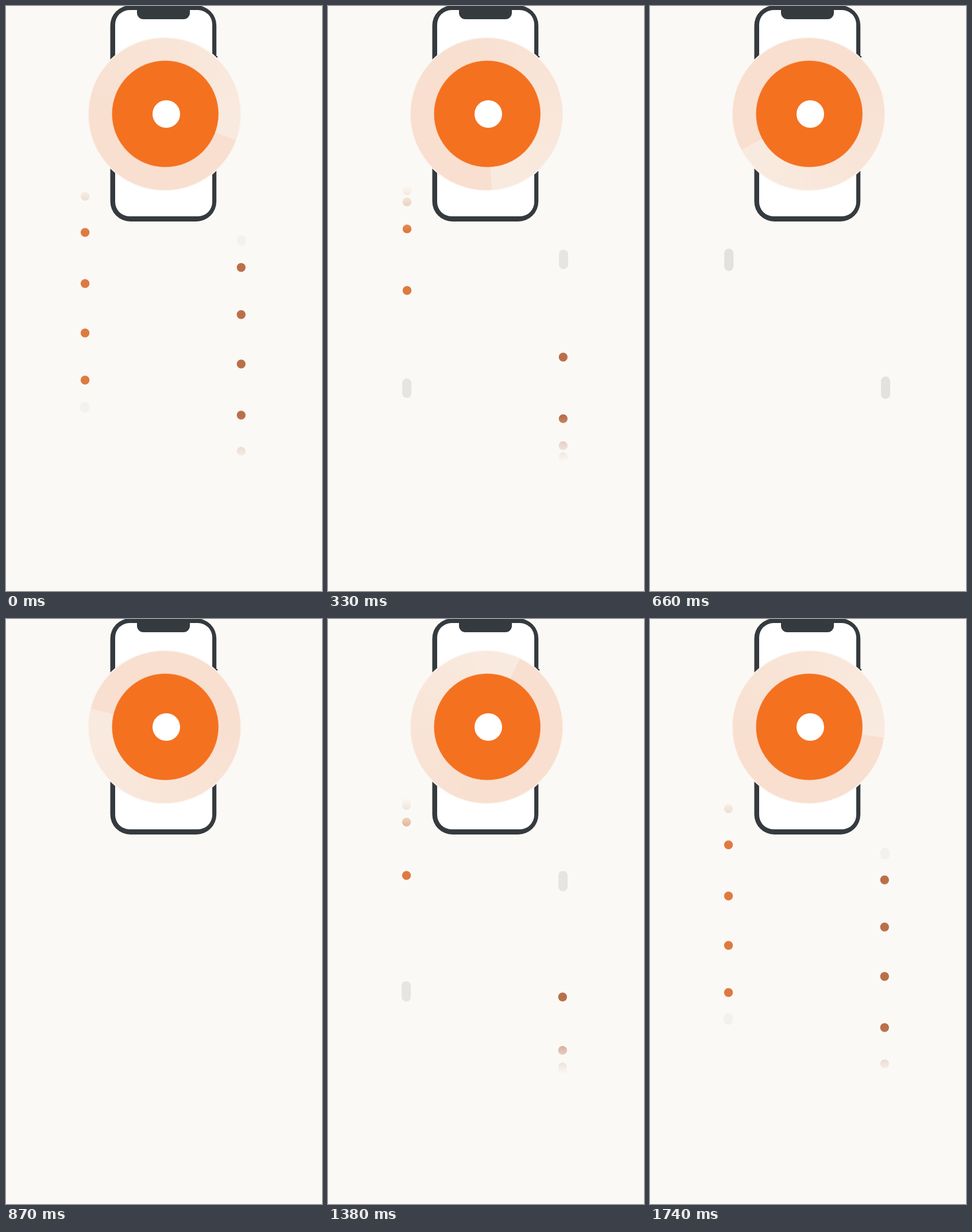
These frames come from a looping animation (550 px wide and 1018 px high, 1770 ms). An HTML page with a canvas:

```html
<!DOCTYPE html>
<html lang="en">
<head>
<meta charset="utf-8">
<title>Phone pairing</title>
<style>
  html, body { margin: 0; width: 100%; height: 100%; overflow: hidden; background: #fbf9f5; }
  canvas { display: block; }
</style>
</head>
<body>
<canvas id="stage" width="550" height="1018"></canvas>
<script>
const ctx = document.getElementById('stage').getContext('2d');
const LOOP = 1770, STEP = 30;
const BACKGROUND = '#fbf9f5', DARK = '#353a3e';
const TOP = 315, MIRROR = 1106;
const RESTING_DOTS = [651, 569, 483, 394, 331];

const clamp = x => Math.min(1, Math.max(0, x));
const smooth = x => x * x * (3 - 2 * x);
const down = y => y, up = y => MIRROR - y;

// Dots blend into the background toward the outer end of their column.
function columnPaint(pale, full, toY) {
  const paint = ctx.createLinearGradient(0, toY(313), 0, toY(391));
  paint.addColorStop(0, BACKGROUND);
  paint.addColorStop(.4, pale);
  paint.addColorStop(1, full);
  return paint;
}

const leftPaint = columnPaint('#ecd8ca', '#de7a40', down);
const rightPaint = columnPaint('#e8d5cd', '#b9704a', up);

function disc(x, y, radius, fill) {
  ctx.beginPath();
  ctx.arc(x, y, radius, 0, 2 * Math.PI);
  ctx.fillStyle = fill;
  ctx.fill();
}

function box(x, y, w, h, radius, fill) {
  ctx.beginPath();
  ctx.roundRect(x, y, w, h, radius);
  ctx.fillStyle = fill;
  ctx.fill();
}

// away: ms between this moment and the nearest full state.
function drawColumn(away, dotX, capsuleX, paint, toY) {
  const spread = smooth(clamp((660 - away) / 630));
  if (spread > 0) {
    RESTING_DOTS.forEach((rest, i) => {
      const y = TOP + (rest - TOP) * spread ** (i + 1);
      disc(dotX, toY(y), 7.7, paint);
    });
  }

  const travel = 5.7 * (Math.exp(.0058 * away) - 1);
  const grown = 1 - (1 - clamp(away / 660)) ** 2;
  const length = 19 + 20 * grown;
  const shade = (.028 + .07 * grown) * clamp((380 - travel) / 100);
  box(capsuleX - 8, toY(698 - travel) - length / 2, 16, length, 8, `rgba(0,18,34,${shade})`);
}

function drawPhone() {
  box(181.5, -1, 184.7, 376, 35, DARK);
  box(190, 7, 169, 359, 25, '#fff');
  box(228, 0, 92, 23, [0, 0, 11, 11], DARK);
  box(366, 87, 2, 3, 0, DARK);
}

function drawBadge(t) {
  const sweep = ctx.createConicGradient((20 + .2 * t) * Math.PI / 180, 276, 188);
  sweep.addColorStop(0, '#f8dfcf');
  sweep.addColorStop(.42, '#f8dfcf');
  sweep.addColorStop(.95, '#f9eadf');
  sweep.addColorStop(1, '#f9eadf');
  disc(276, 188, 134, '#fcf6f1');
  disc(276, 188, 132.3, sweep);
  disc(277.2, 187.7, 92.9, '#f6a675');
  disc(277.2, 187.7, 92.3, '#f47120');
  disc(279, 188, 24, '#fff');
}

function draw(now) {
  const t = Math.floor(now % LOOP / STEP) * STEP;
  const away = Math.min(t, LOOP - t);

  ctx.fillStyle = BACKGROUND;
  ctx.fillRect(0, 0, 550, 1018);
  ctx.save();
  if (t > LOOP / 2) ctx.translate(-1, -1); // the way back runs one pixel up and left
  drawColumn(away, 137.6, 137.2, leftPaint, down);
  drawColumn(away, 409.3, 410, rightPaint, up);
  ctx.restore();
  drawPhone();
  drawBadge(t);
  requestAnimationFrame(draw);
}
requestAnimationFrame(draw);
</script>
</body>
</html>
```
